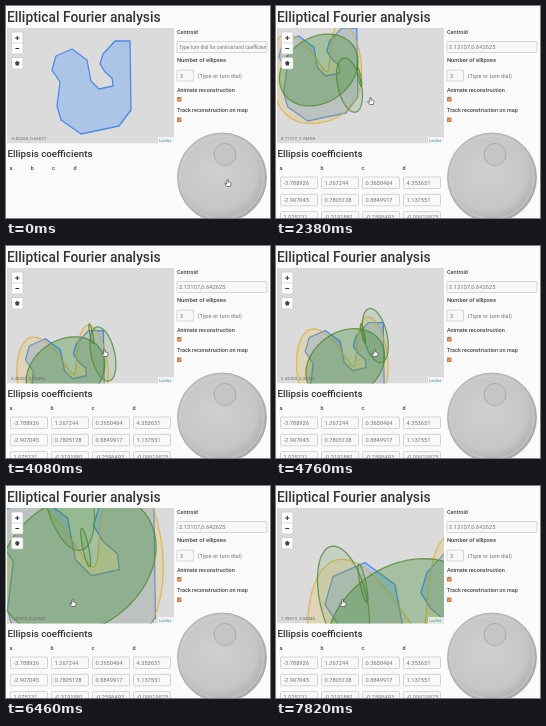
Animation of 264 by 212 pixels, one loop 7.99 s. Source, as an HTML page:

```html
<!DOCTYPE html>
<html lang="en">
<head>
<meta charset="utf-8">
<title>Elliptical Fourier analysis</title>
<style>
  html, body { margin: 0; width: 100%; height: 100%; overflow: hidden; background: #fbfbfb; }
  svg { display: block; width: 100%; height: 100%; }
  text { font: 5.7px Roboto, Arial, sans-serif; fill: #777; }
  .head { font-weight: 500; fill: #333; }
  .label { font-size: 5.5px; font-weight: 500; fill: #444; }
  .field { fill: #f8f8f8; stroke: #c4c4c4; stroke-width: .7; }
  .button { fill: #fff; stroke: #c4c4c4; stroke-width: .7; }
  .shape { stroke-width: 1.3; stroke-linejoin: round; stroke-opacity: .8; fill-opacity: .22; }
  .polygon { stroke: #4c8ae6; stroke-opacity: 1; fill: #3388ff; fill-opacity: .28; }
  .outline { stroke: #d9b04a; fill: #f0b93c; }
  .ellipse { stroke: #4f8a38; fill: #348524; fill-opacity: .12; }
  .ellipse.main { fill-opacity: .32; }
</style>
</head>
<body>
<svg id="stage" viewBox="0 0 264 212">
  <defs>
    <clipPath id="mapClip"><rect x="1" y="22" width="167" height="115.5"/></clipPath>
    <clipPath id="inputClip"><rect x="171" y="35" width="89" height="12"/></clipPath>
    <radialGradient id="dialShade" cx=".45" cy=".43" r=".58">
      <stop offset="0" stop-color="#d0d0d0"/>
      <stop offset=".75" stop-color="#c6c6c6"/>
      <stop offset="1" stop-color="#adadad"/>
    </radialGradient>
  </defs>

  <text class="head" x="1" y="16" style="font-size:13.8px">Elliptical Fourier analysis</text>

  <g clip-path="url(#mapClip)">
    <rect x="1" y="22" width="167" height="115.5" fill="#dbdbdb"/>
    <g id="shapes"></g>
    <rect x="152" y="131" width="16" height="7" fill="#fff" opacity=".7"/>
    <text x="153" y="136" style="font-size:4px;fill:#3c87b4">Leaflet</text>
    <text id="position" x="5" y="134" style="font-size:4.4px;fill:#666"></text>
  </g>
  <rect class="button" x="5.5" y="26" width="11.5" height="22" rx="1.5"/>
  <path d="M5.5 37H17" stroke="#ccc" stroke-width=".7"/>
  <path d="M9.2 32h4.2M11.3 29.9v4.2M9.4 42.5h3.8" stroke="#333" stroke-width="1.1"/>
  <rect class="button" x="5.5" y="51.5" width="11.5" height="11.5" rx="1.5"/>
  <path d="M11.3 54.8l2.3 1.8-.9 2.8H9.9L9 56.6z" fill="#444"/>

  <text class="label" x="171" y="27.5">Centroid</text>
  <rect class="field" x="171" y="35.5" width="90" height="11" rx="1"/>
  <text id="centroid" x="173" y="43" clip-path="url(#inputClip)"></text>
  <text class="label" x="171" y="55.5" style="font-size:5.8px">Number of ellipses</text>
  <rect class="field" x="171" y="64" width="16.5" height="11" rx="1"/>
  <text x="174" y="71.5">3</text>
  <text x="191.5" y="71.5">(Type or turn dial)</text>
  <text class="label" x="171" y="85.5">Animate reconstruction</text>
  <text class="label" x="171" y="106">Track reconstruction on map</text>
  <g fill="#c9793f">
    <rect x="171" y="91" width="4.5" height="4.5" rx=".6"/>
    <rect x="171" y="111.5" width="4.5" height="4.5" rx=".6"/>
  </g>
  <path d="M172 93.2l1 1 1.6-2M172 113.7l1 1 1.6-2" fill="none" stroke="#fff" stroke-width=".6"/>

  <circle cx="216" cy="171.5" r="44.5" fill="url(#dialShade)" stroke="#a0a0a0" stroke-width=".8"/>
  <circle cx="216" cy="171.5" r="41.5" fill="none" stroke="#d4d4d4" stroke-width=".7"/>
  <circle cx="219" cy="148.5" r="11" fill="#c5c5c5" stroke="#a5a5a5" stroke-width=".9"/>

  <text class="head" x="1.5" y="151" style="font-size:9.8px">Ellipsis coefficients</text>
  <g id="headers"></g>
  <g id="cells"></g>

  <path id="cursor" d="M0-3.5q.9-.6 1.2.4v2l2.3.6q.8.4.5 1.4l-.7 2.6h-3.6l-2.2-2.9q.3-1 1.4-.1l.9.7z"
        fill="#fff" stroke="#333" stroke-width=".6"/>
</svg>
<script>
const FRAME = 170, LOOP = 7990;
const RESULT_AT = 680;    // coefficients appear
const TRACK_AT = 970;     // reconstruction starts and the map follows it
const STEP_ANGLE = 2 * Math.PI / 64;
const VIEW = { x: 84.5, y: 79.5 };
const HOME = { x: 86, y: 77 };
const BASE_SCALE = 9;

// Rows of a, b (vertical) and c, d (horizontal)
const COEFFICIENTS = [
  ['-3.788926', '1.267244', '0.3650464', '4.353651'],
  ['-2.907045', '0.7805128', '0.8849917', '1.137551'],
  ['1.025131', '-0.3191881', '-0.2596493', '-0.09619875']
];
const harmonics = COEFFICIENTS.map(row => row.map(Number));

// Outline around the centroid, in pixels at the base scale
const POLYGON = [
  [-40, -13], [-36, -27], [-20, -34], [-5, -23], [-1, -2], [7, 6], [21, 3], [20, -5], [13, -11],
  [8, -19], [11, -29], [23, -42], [38, -42], [39, 27], [27, 43], [-11, 51], [-31, 37], [-35, 23], [-32, -1]
];
const ZOOM_KEYS = [[0, 0], [2380, 0], [2720, 1], [3230, 1], [3570, 0], [4760, 0], [5100, 1], [LOOP, 1]];
const CURSOR_KEYS = [
  [0, 221, 177], [1700, 221, 177], [2380, 94, 95], [3230, 94, 95], [4080, 98, 107],
  [4760, 98, 107], [5440, 75, 124], [6460, 66, 117], [LOOP, 66, 117]
];
const POSITIONS = [
  [0, '-0.02260, 0.66677'], [2210, '8.71777, 2.74658'], [3570, '5.43350, 2.32496'],
  [4930, '2.13147, 0.98236'], [5950, '1.25570, 0.43945'], [7140, '1.39319, 2.04346']
];

const $ = id => document.getElementById(id);

function add(parent, tag, attributes, text = '') {
  const node = document.createElementNS($('stage').namespaceURI, tag);
  for (const name in attributes) node.setAttribute(name, attributes[name]);
  node.textContent = text;
  return parent.appendChild(node);
}

function keyed(keys, ms) {
  const i = Math.max(1, keys.findIndex(key => key[0] >= ms));
  const [from, to] = [keys[i - 1], keys[i]];
  const u = (ms - from[0]) / (to[0] - from[0]);
  const eased = u * u * (3 - 2 * u);
  return from.slice(1).map((value, k) => value + (to[k + 1] - value) * eased);
}

function orbit(n, angle) {
  const [a, b, c, d] = harmonics[n];
  const cos = Math.cos(angle), sin = Math.sin(angle);
  return [c * cos + d * sin, -(a * cos + b * sin)];
}

// Sum of the first count harmonics
function pointAt(angle, count = harmonics.length) {
  let x = 0, y = 0;
  for (let n = 0; n < count; n++) {
    const [dx, dy] = orbit(n, angle * (n + 1));
    x += dx;
    y += dy;
  }
  return [x, y];
}

const closedCurve = at => Array.from({ length: 120 }, (_, i) => at(i / 120 * 2 * Math.PI));
const toPath = (points, x, y, scale) =>
  'M' + points.map(p => `${(x + p[0] * scale).toFixed(2)} ${(y + p[1] * scale).toFixed(2)}`).join('L') + 'Z';

const outline = closedCurve(angle => pointAt(angle));
const ellipses = harmonics.map((_, n) => closedCurve(angle => orbit(n, angle)));

const addShape = kind => add($('shapes'), 'path', { class: 'shape ' + kind });
const polygonPath = addShape('polygon');
const outlinePath = addShape('outline');
const ellipsePaths = ellipses.map((_, n) => addShape(n ? 'ellipse' : 'ellipse main'));

const headers = [...'abcd'].map(letter => add($('headers'), 'text', { class: 'label', y: 163.5 }, letter));
COEFFICIENTS.forEach((row, r) => row.forEach((value, c) => {
  const x = 4.5 + c * 41, y = 171 + r * 17.3;
  add($('cells'), 'rect', { class: 'field', x, y, width: 37, height: 11.5, rx: 1 });
  add($('cells'), 'text', { x: x + 3, y: y + 7.8 }, value);
}));

function render(ms) {
  const solved = ms >= RESULT_AT, tracking = ms >= TRACK_AT;
  const angle = (ms - TRACK_AT) / FRAME * STEP_ANGLE;
  const scale = BASE_SCALE * 2 ** keyed(ZOOM_KEYS, ms)[0];
  let { x, y } = HOME;
  if (tracking) {
    const tip = pointAt(angle);
    x = VIEW.x - tip[0] * scale;
    y = VIEW.y - tip[1] * scale;
  }

  polygonPath.setAttribute('d', toPath(POLYGON, x, y, scale / BASE_SCALE));
  outlinePath.setAttribute('d', tracking ? toPath(outline, x, y, scale) : '');
  ellipsePaths.forEach((path, n) => {
    const [dx, dy] = pointAt(angle, n);
    path.setAttribute('d', tracking ? toPath(ellipses[n], x + dx * scale, y + dy * scale, scale) : '');
  });

  $('centroid').textContent = solved ? '2.13107,0.642625' : 'Type turn dial for centroid and coefficients';
  $('centroid').style.fontSize = solved ? '5.8px' : '4.9px';
  $('cells').style.display = solved ? '' : 'none';
  headers.forEach((header, c) => header.setAttribute('x', 3.5 + c * (solved ? 41 : 21.3)));
  $('position').textContent = POSITIONS.filter(entry => entry[0] <= ms).pop()[1];
  $('cursor').setAttribute('transform', `translate(${keyed(CURSOR_KEYS, ms).join(' ')})`);
}

const start = performance.now();
function tick() {
  const ms = (performance.now() - start) % LOOP;
  render(Math.floor(ms / FRAME) * FRAME);
  requestAnimationFrame(tick);
}
tick();
</script>
</body>
</html>
```
